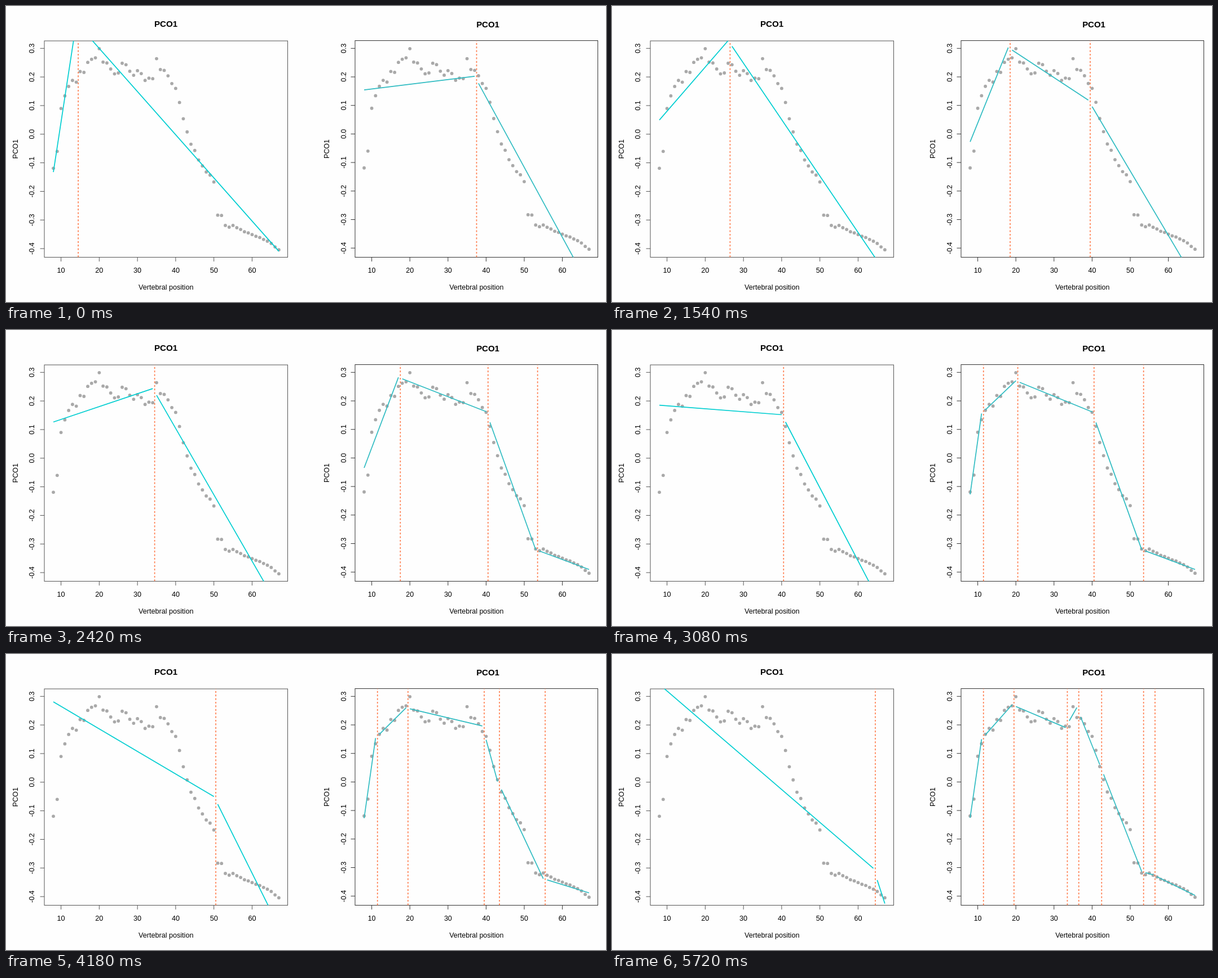
Animation, 1064 px wide and 526 px high, one loop 6.16 s. Source, as an HTML page with a canvas:

```html
<!DOCTYPE html>
<html lang="en">
<head>
<meta charset="utf-8">
<title>Segmented regression of PCO1</title>
<style>
  html, body { margin: 0; width: 100%; height: 100%; overflow: hidden; background: #fefefe; }
  canvas { display: block; }
</style>
</head>
<body>
<canvas id="stage" width="1064" height="526"></canvas>
<script>
const ctx = document.getElementById('stage').getContext('2d');
const STEP = 220, SLOTS = 28, FIRST = 8;

// PCO1 scores (thousandths) for vertebrae 8 to 67
const scores = [
  -119, -60, 90, 134, 167, 188, 182, 219, 216, 251, 262, 267, 299, 252, 249,
  228, 211, 214, 248, 243, 220, 206, 222, 212, 188, 196, 194, 264, 226, 223,
  204, 177, 160, 111, 54, 8, -35, -57, -90, -111, -132, -143, -167, -283, -284,
  -319, -325, -319, -327, -333, -341, -345, -351, -357, -361, -368, -374, -382, -394, -404
].map(v => v / 1000);
const LAST = FIRST + scores.length - 1;

// Best breakpoints for 1 to 7 breaks
const bestBreaks = [
  [37], [18, 39], [17, 40, 53], [11, 20, 40, 53], [11, 19, 39, 43, 55],
  [11, 19, 33, 38, 52, 55], [11, 19, 33, 36, 42, 53, 56]
];

const panels = [
  { left: 68, right: 499.5, top: 62, bottom: 446.5, x0: 29.8, dx: 6.777, y0: 227.8, dy: 508.3,
    titleX: 283.5, titleY: 37, labelX: 20.5, tickX: 50, size: 12.6, frame: '#555', line: '#00ced1',
    breaks: k => [14 + 2 * k] },
  { left: 619, right: 1049.5, top: 61.5, bottom: 446.5, x0: 581, dx: 6.76, y0: 227.4, dy: 507,
    titleX: 854.5, titleY: 37.5, labelX: 573, tickX: 602.5, size: 12.45, frame: '#333', line: '#30bcc2',
    breaks: k => bestBreaks[Math.floor(k / 4)] }
];

// Least-squares fit of a continuous piecewise-linear curve
function fit(breaks) {
  const basis = x => [1, (x - 37) / 30, ...breaks.map(b => Math.max(x - b, 0) / 30)];
  const n = breaks.length + 2;
  const m = Array.from({ length: n }, () => Array(n + 1).fill(0));
  scores.forEach((y, i) => {
    const row = [...basis(FIRST + i), y];
    for (let r = 0; r < n; r++) for (let c = 0; c <= n; c++) m[r][c] += row[r] * row[c];
  });
  for (let p = 0; p < n; p++) {
    for (let r = 0; r < n; r++) {
      if (r === p) continue;
      const f = m[r][p] / m[p][p];
      for (let c = p; c <= n; c++) m[r][c] -= f * m[p][c];
    }
  }
  const coef = m.map((row, i) => row[n] / row[i]);
  return x => basis(x).reduce((sum, b, i) => sum + b * coef[i], 0);
}

function text(str, x, y, size, vertical, bold) {
  ctx.save();
  ctx.translate(x, y);
  if (vertical) ctx.rotate(-Math.PI / 2);
  ctx.font = `${bold ? 'bold ' : ''}${size}px "Liberation Sans", Arial, sans-serif`;
  ctx.fillStyle = '#000';
  ctx.textAlign = 'center';
  ctx.fillText(str, 0, 0);
  ctx.restore();
}

function stroke(x1, y1, x2, y2) {
  ctx.beginPath();
  ctx.moveTo(x1, y1);
  ctx.lineTo(x2, y2);
  ctx.stroke();
}

function drawAxes(p, X, Y) {
  const midX = (p.left + p.right) / 2, midY = (p.top + p.bottom) / 2;
  ctx.strokeStyle = p.frame;
  ctx.lineWidth = 1;
  ctx.strokeRect(p.left, p.top, p.right - p.left, p.bottom - p.top);
  for (let v = 10; v <= 60; v += 10) {
    stroke(X(v), p.bottom, X(v), p.bottom + 7.5);
    text(v, X(v), 474, p.size);
  }
  for (let i = -4; i <= 3; i++) {
    stroke(p.left, Y(i / 10), p.left - 7.5, Y(i / 10));
    text((i / 10).toFixed(1), p.tickX, Y(i / 10), p.size, true);
  }
  text('PCO1', p.titleX, p.titleY, p.size * 1.2, false, true);
  text('PCO1', p.labelX, midY, p.size, true);
  text('Vertebral position', midX, 504, p.size);
}

function drawPanel(p, k) {
  const X = v => p.x0 + v * p.dx, Y = v => p.y0 - v * p.dy;
  const breaks = p.breaks(k), curve = fit(breaks);
  drawAxes(p, X, Y);

  ctx.save();
  ctx.beginPath();
  ctx.rect(p.left, p.top, p.right - p.left, p.bottom - p.top);
  ctx.clip();

  ctx.fillStyle = '#a9a9a9';
  scores.forEach((y, i) => {
    ctx.beginPath();
    ctx.arc(X(FIRST + i), Y(y), 2.9, 0, 2 * Math.PI);
    ctx.fill();
  });

  ctx.lineWidth = 1.7;
  ctx.strokeStyle = p.line;
  [...breaks, LAST].forEach((end, i) => {
    const start = i ? breaks[i - 1] + 1 : FIRST;
    stroke(X(start), Y(curve(start)), X(end), Y(curve(end)));
  });

  ctx.strokeStyle = '#ff7f50';
  ctx.setLineDash([3.2, 3.2]);
  breaks.forEach(b => stroke(X(b + 0.5), p.bottom, X(b + 0.5), p.top));
  ctx.restore();
}

function draw(now) {
  const slot = Math.floor(now / STEP) % SLOTS;
  const k = Math.min(Math.max(slot - 1, 0), 25); // first and last steps stay twice as long
  ctx.fillStyle = '#fefefe';
  ctx.fillRect(0, 0, 1064, 526);
  panels.forEach(p => drawPanel(p, k));
  requestAnimationFrame(() => draw(performance.now()));
}
draw(performance.now());
</script>
</body>
</html>
```
